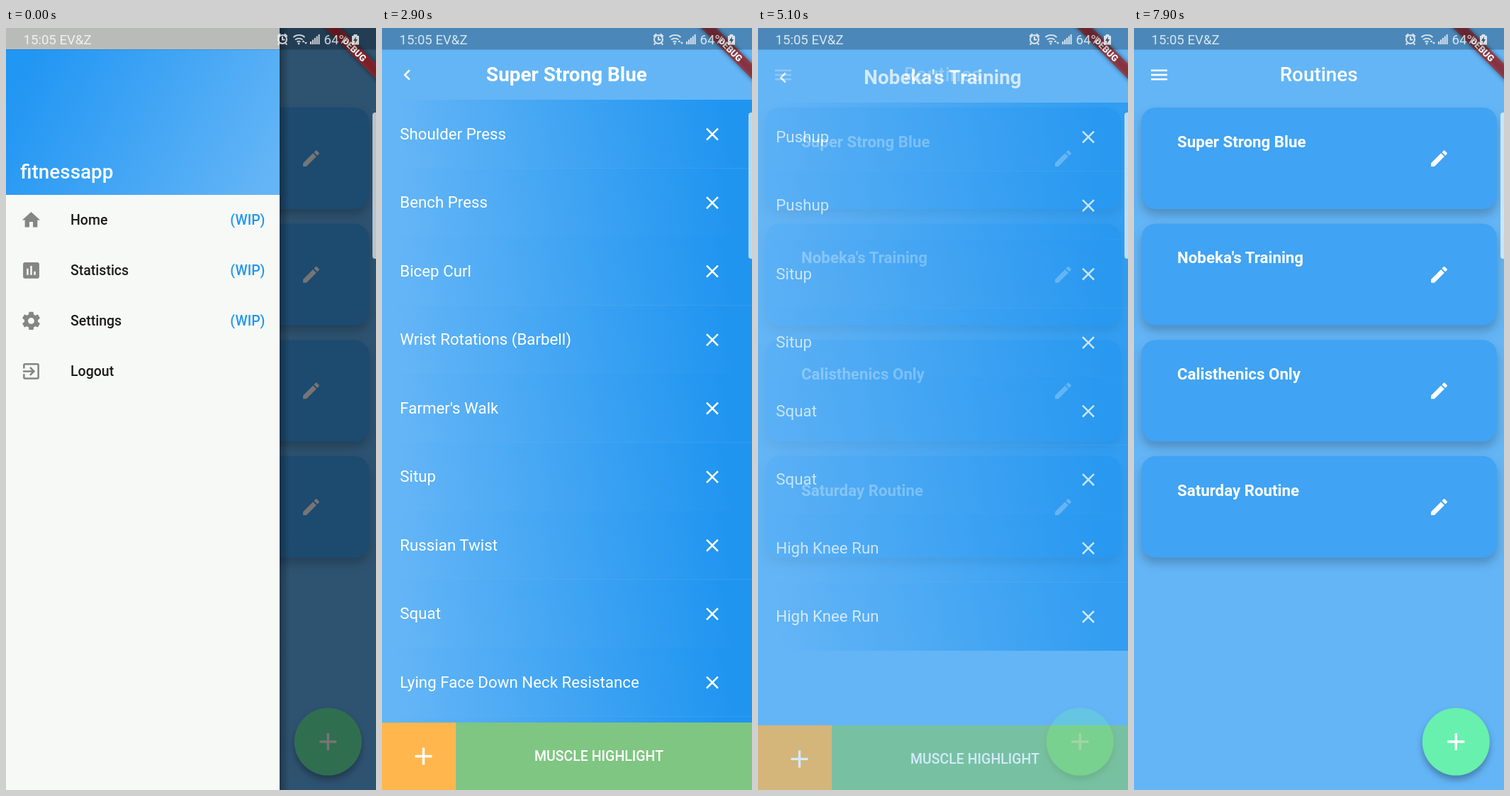
These frames come from a looping animation (522x1073 px, 8 s). An HTML page:

```html
<!DOCTYPE html>
<html lang="en">
<head>
<meta charset="utf-8">
<title>Workout routines</title>
<style>
html, body { margin: 0; width: 100%; height: 100%; overflow: hidden; background: #64b5f6; }
svg { display: block; width: 522px; height: 1073px; font-family: Roboto, sans-serif; fill: #fff; }
.title { font-size: 27.87px; font-weight: 500; }
.bold { font-weight: 700; }
.item { font-size: 22.3px; }
.label { font-size: 19.5px; font-weight: 500; }
</style>
</head>
<body>
<svg id="stage" viewBox="0 0 522 1073" xmlns="http://www.w3.org/2000/svg"></svg>
<script>
const LOOP = 8000, W = 522, H = 1073, DRAWER = 386, ROW = 96.5, DP = 1.267;
const BLUE = '#64b5f6';

const ICONS = {
  menu: 'M3 18h18v-2H3v2zm0-5h18v-2H3v2zm0-7v2h18V6H3z',
  edit: 'M3 17.25V21h3.75L17.81 9.94l-3.75-3.75L3 17.25zM20.71 7.04c.39-.39.39-1.02 0-1.41l-2.34-2.34c-.39-.39-1.02-.39-1.41 0l-1.83 1.83 3.75 3.75 1.83-1.83z',
  close: 'M19 6.41L17.59 5 12 10.59 6.41 5 5 6.41 10.59 12 5 17.59 6.41 19 12 13.41 17.59 19 19 17.59 13.41 12z',
  back: 'M15.41 7.41L14 6l-6 6 6 6 1.41-1.41L10.83 12z',
  home: 'M10 20v-6h4v6h5v-8h3L12 3 2 12h3v8z',
  chart: 'M19 3H5c-1.1 0-2 .9-2 2v14c0 1.1.9 2 2 2h14c1.1 0 2-.9 2-2V5c0-1.1-.9-2-2-2zM9 17H7v-7h2v7zm4 0h-2V7h2v10zm4 0h-2v-4h2v4z',
  gear: 'M19.43 12.98c.04-.32.07-.64.07-.98s-.03-.66-.07-.98l2.11-1.65c.19-.15.24-.42.12-.64l-2-3.46c-.12-.22-.39-.3-.61-.22l-2.49 1c-.52-.4-1.08-.73-1.69-.98l-.38-2.65C14.46 2.18 14.25 2 14 2h-4c-.25 0-.46.18-.49.42l-.38 2.65c-.61.25-1.17.59-1.69.98l-2.49-1c-.23-.09-.49 0-.61.22l-2 3.46c-.13.22-.07.49.12.64l2.11 1.65c-.04.32-.07.65-.07.98s.03.66.07.98l-2.11 1.65c-.19.15-.24.42-.12.64l2 3.46c.12.22.39.3.61.22l2.49-1c.52.4 1.08.73 1.69.98l.38 2.65c.03.24.24.42.49.42h4c.25 0 .46-.18.49-.42l.38-2.65c.61-.25 1.17-.59 1.69-.98l2.49 1c.23.09.49 0 .61-.22l2-3.46c.12-.22.07-.49-.12-.64l-2.11-1.65zM12 15.5c-1.93 0-3.5-1.57-3.5-3.5s1.57-3.5 3.5-3.5 3.5 1.57 3.5 3.5-1.57 3.5-3.5 3.5z',
  exit: 'M10.09 15.59L11.5 17l5-5-5-5-1.41 1.41L12.67 11H3v2h9.67l-2.58 2.59zM19 3H5c-1.11 0-2 .9-2 2v4h2V5h14v14H5v-4H3v4c0 1.1.89 2 2 2h14c1.1 0 2-.9 2-2V5c0-1.1-.9-2-2-2z'
};

const icon = (name, cx, cy, fill = '#fff') =>
  `<path d="${ICONS[name]}" fill="${fill}" transform="translate(${cx - 12 * DP} ${cy - 12 * DP}) scale(${DP})"/>`;
const text = (s, x, y, cls, extra = '') => `<text x="${x}" y="${y}" class="${cls}" ${extra}>${s}</text>`;
const rect = (x, y, w, h, fill, extra = '') =>
  `<rect x="${x}" y="${y}" width="${w}" height="${h}" fill="${fill}" ${extra}/>`;
const plus = (x, y) => `<path d="M${x - 12} ${y}h24M${x} ${y - 12}v24" stroke="#fff" stroke-width="3.4"/>`;

const routines = ['Super Strong Blue', "Nobeka's Training", 'Calisthenics Only', 'Saturday Routine'];
const plans = [
  ['Shoulder Press', 'Bench Press', 'Bicep Curl', 'Wrist Rotations (Barbell)', "Farmer's Walk", 'Situp',
    'Russian Twist', 'Squat', 'Lying Face Down Neck Resistance', 'Lying Face Up Neck Resistance'],
  ['Pushup', 'Situp', 'Squat', 'High Knee Run'].flatMap(s => [s, s])
];

const cardY = i => 112 + i * 163.6;

const card = (name, i) => {
  const y = cardY(i);
  return rect(10.5, y, 501.5, 143, '#40a3f3', 'rx="20" filter="url(#cardShadow)"') +
    `<g id="ink${i}" clip-path="url(#inkClip${i})">${rect(40, y + 30, 441.5, 83, '#bcbcbc', 'class="tint"')}
     <circle cx="270" cy="${y + 75}" fill="#c8c8c8"/></g>` +
    text(name, 61, y + 55.7, 'item bold') + icon('edit', 430.5, y + 71.7);
};

const homePage = () => rect(0, 0, W, H, BLUE) + icon('menu', 35.5, 66) +
  text('Routines', 260.7, 75, 'title', 'text-anchor="middle"') +
  routines.map(card).join('') +
  `<circle cx="454.3" cy="1005" r="47.5" fill="#68f0ae" filter="url(#fabShadow)"/>` + plus(454.3, 1005);

const row = (name, i) => `<g transform="translate(0 ${101 + i * ROW})">
  ${rect(0, 0, W, ROW, 'url(#rowFill)')}${text(name, 25.3, 55.8, 'item')}${icon('close', 466, 48.6)}</g>`;

const planPage = (list, i) => `<g id="page${i}">${rect(0, 0, W, H, BLUE)}
  <g clip-path="url(#listClip)"><g id="list${i}">${list.map(row).join('')}</g></g>
  ${icon('back', 35.5, 66)}${text(routines[i], 260.5, 75, 'title bold', 'text-anchor="middle"')}
  ${rect(0, 978, 104.5, 95, '#ffb74d')}${rect(104.5, 978, 417.5, 95, '#7fc682')}
  ${plus(58.5, 1025.5)}${text('MUSCLE HIGHLIGHT', 215, 1032, 'label bold')}</g>`;

const entry = ([glyph, name], i) => {
  const y = 270.4 + i * 71;
  return icon(glyph, 35.5, y, '#858585') + text(name, 91, y + 6.8, 'label', 'fill="#1c1c1c"') +
    (i < 3 ? text('(WIP)', 365.5, y + 6.8, 'label', 'fill="#2196f3" text-anchor="end"') : '');
};

const drawerPanel = () => `<g id="drawer">${rect(DRAWER, 0, 14, H, 'url(#edge)')}
  ${rect(0, 0, DRAWER, H, '#f7f9f6')}${rect(0, 30, DRAWER, 205, 'url(#head)')}
  ${text('fitnessapp', 20.3, 211.5, 'title')}
  ${[['home', 'Home'], ['chart', 'Statistics'], ['gear', 'Settings'], ['exit', 'Logout']].map(entry).join('')}</g>`;

const banner = () => `<g transform="translate(522 0) rotate(45)">
  ${rect(-60, 35.5, 120, 15.2, '#000', 'opacity=".5" filter="url(#soft)"')}
  ${rect(-60, 35.5, 120, 15.2, '#b71c1c', 'opacity=".63"')}
  ${text('DEBUG', 0, 47.7, '', 'font-size="12.9" font-weight="900" text-anchor="middle"')}</g>`;

const bars = [4, 6.5, 9, 11.5, 14].map((h, i) => rect(429 + i * 2.9, 23 - h, 2, h, '#fff')).join('');
const statusBar = () => `${rect(0, 0, W, 30.5, '#000', 'opacity=".25"')}
  <g opacity=".78" font-size="18.6">${text('15:05 EV&amp;Z', 24.5, 22.8, '')}${text('64%', 448.5, 22.8, '')}
  <g fill="none" stroke="#fff" stroke-width="2"><circle cx="390" cy="16" r="6"/>
  <path d="M390 12v4.5h3.5M383.2 12l4-3.8M396.8 12l-4-3.8M385.5 21.5l-1.8 2M394.5 21.5l1.8 2"/>
  <path d="M405.5 13a12 12 0 0 1 16 0M408 16.5a8 8 0 0 1 10.5 0M410.5 19.5a4.5 4.5 0 0 1 5 0" stroke-width="1.7"/></g>
  <circle cx="413" cy="22" r="1.4"/><path d="M419.5 17l2 3h-4zM423 23l2-3h-4z"/>${bars}
  <path d="M490.500 9h5v2h2.500v12.500h-10V11h2.500z"/><path d="M494 12l-4 6h2.500l-.5 4 4-6h-2.500z" fill="#345"/></g>`;

const shadow = (id, dy, blur, alpha) => `<filter id="${id}" x="-30%" y="-30%" width="160%" height="170%"
  color-interpolation-filters="sRGB"><feDropShadow dx="0" dy="${dy}" stdDeviation="${blur}" flood-opacity="${alpha}"/></filter>`;
const gradient = (id, [x1, y1, x2, y2], stops) => `<linearGradient id="${id}" gradientUnits="userSpaceOnUse"
  x1="${x1}" y1="${y1}" x2="${x2}" y2="${y2}">${stops.map(([at, color, alpha = 1]) =>
  `<stop offset="${at}" stop-color="${color}" stop-opacity="${alpha}"/>`).join('')}</linearGradient>`;
const clip = (id, ...box) => `<clipPath id="${id}">${rect(...box, '#000')}</clipPath>`;

const stage = document.getElementById('stage');
stage.innerHTML = `<defs>
  ${shadow('cardShadow', 8, 7, .22)}${shadow('fabShadow', 6, 5, .3)}
  <filter id="soft" x="-20%" y="-100%" width="140%" height="300%"><feGaussianBlur stdDeviation="3"/></filter>
  ${gradient('rowFill', [0, ROW, W, 0], [[.06, BLUE], [.92, '#2095f0']])}
  ${gradient('head', [0, 30, DRAWER, 235], [[.08, '#2196f3'], [.95, BLUE]])}
  ${gradient('edge', [DRAWER, 0, DRAWER + 14, 0], [[0, '#000', .32], [1, '#000', 0]])}
  ${clip('listClip', 0, 101, W, 877)}
  ${routines.map((_, i) => clip('inkClip' + i, 40, cardY(i) + 30, 441.5, 83)).join('')}
</defs>
${homePage()}${plans.map(planPage).join('')}
${rect(0, 0, W, H, '#000', 'id="scrim"')}${drawerPanel()}${banner()}${statusBar()}
<path d="M522 119h-1a4 4 0 0 0-4 4v198a4 4 0 0 0 4 4h1z" opacity=".66"/>`;

const $ = id => document.getElementById(id);
const clamp = x => Math.min(1, Math.max(0, x));
const phase = (t, from, to) => clamp((t - from) / (to - from));
const swing = x => (1 - Math.cos(Math.PI * x)) / 2;
const show = (el, on) => el.setAttribute('display', on ? 'inline' : 'none');

// press: finger down, tap: finger up (the page opens), back: the page closes
const touches = [
  { card: 0, press: 2440, tap: 2560, back: 4250 },
  { card: 1, press: 4740, tap: 4860, back: 6200 },
  { card: 3, press: 7605, tap: Infinity, back: Infinity }
];

function drawInk(t, { card, press, tap }) {
  const ink = $('ink' + card), fade = 1 - phase(t, tap, tap + 250);
  const on = t >= press && fade > 0;
  show(ink, on);
  if (!on) return;
  const slow = (Math.min(t, tap) - press) * .225;
  const r = slow + (225 - slow) * phase(t, tap, tap + 200);
  const [tint, spot] = ink.children;
  tint.setAttribute('opacity', .4 * phase(t, press, press + 200) * fade);
  spot.setAttribute('opacity', .4 * fade);
  spot.setAttribute('r', r);
}

function drawPage(t, { card, tap, back }) {
  const page = $('page' + card);
  if (!page) return;
  const open = phase(t, tap, tap + 300) - phase(t, back, back + 300);
  show(page, open > 0);
  page.setAttribute('opacity', open * open * (1.6 - .6 * open));
  page.setAttribute('transform', `translate(0 ${H / 4 * (1 - open) ** 2.6})`);
}

function draw(t) {
  const p = 1 - swing(phase(t, 1070, 1490));
  show($('drawer'), p > 0);
  $('drawer').setAttribute('transform', `translate(${DRAWER * (p - 1)} 0)`);
  $('scrim').setAttribute('opacity', .54 * p);
  touches.forEach(touch => { drawInk(t, touch); drawPage(t, touch); });
  const scroll = 32 * (swing(phase(t, 3330, 3750)) - swing(phase(t, 3800, 4200)));
  $('list0').setAttribute('transform', `translate(0 ${-scroll})`);
}

show($('ink2'), false);
const start = performance.now();
function tick() {
  draw((performance.now() - start) % LOOP);
  requestAnimationFrame(tick);
}
tick();
</script>
</body>
</html>
```
